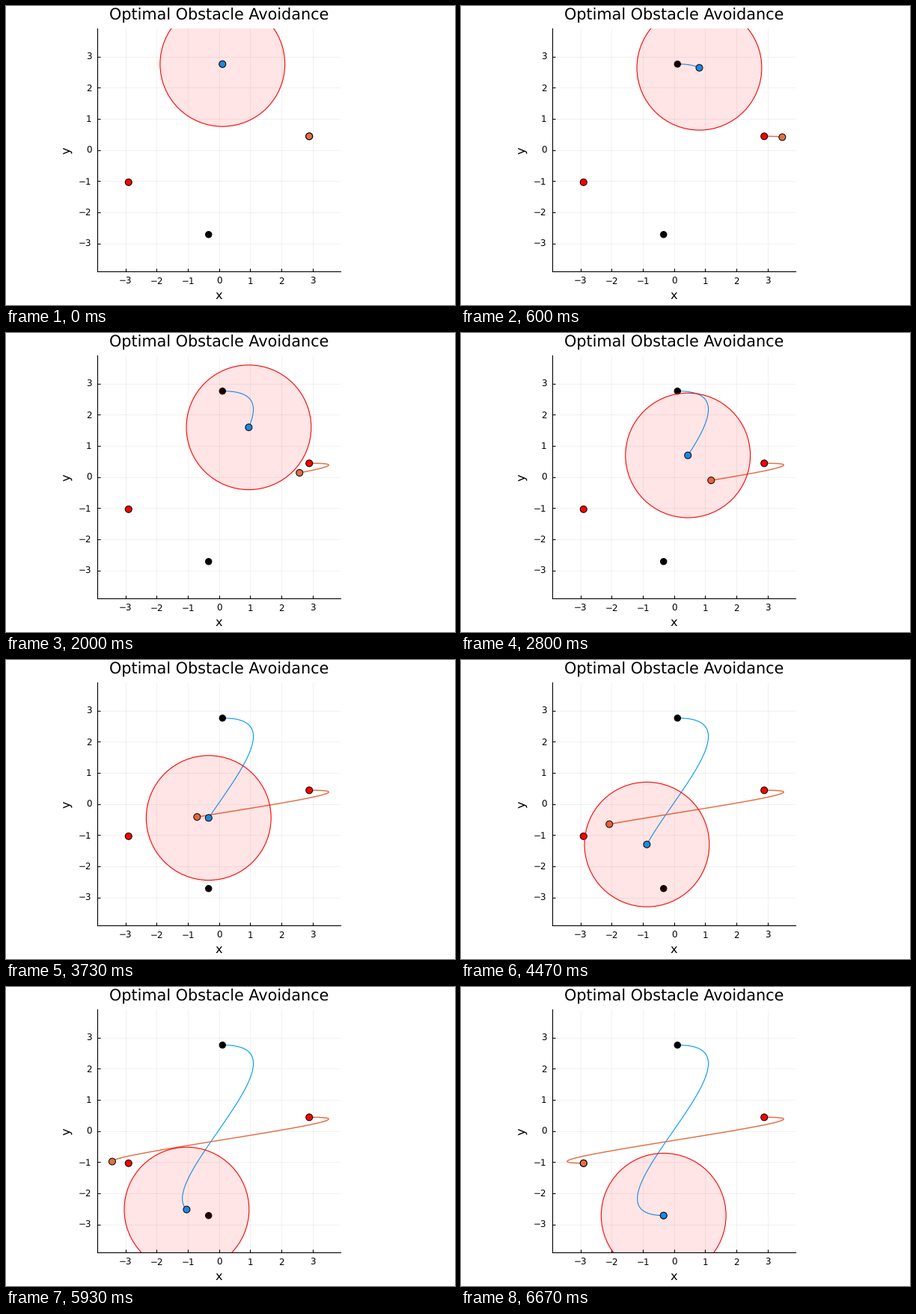
These frames come from a looping animation (600x400 px, 6740 ms). A matplotlib script:

```python
import numpy as np
import matplotlib.pyplot as plt
from matplotlib.animation import FuncAnimation
from matplotlib.patches import Circle

W, H, DPI = 600, 400, 100
LOOP, TICK = 6740, 20            # ms
STEPS, STEP_MS = 100, 1000 / 15  # states per run, time of each
LIM, UNIT = 3.9, 41.7            # axis limit, pixels per unit
CX, CY = 284.7, 192.7            # pixel place of the axes' zero
BLUE, ORANGE = "#009afa", "#e26f46"
THIN = 0.8
TITLE, GUIDE, LABEL = (1.067 * pt for pt in (14, 11, 8))

plt.rcParams["font.family"] = "DejaVu Sans"
plt.rcParams["text.hinting"] = "no_hinting"


def hermite(p0, p1, v0, v1):
    """Cubic path between two points with given end velocities."""
    s = np.linspace(0, 1, STEPS + 1)[:, None]
    p0, p1, v0, v1 = map(np.array, (p0, p1, v0, v1))
    return (p0 + (p1 - p0) * s**2 * (3 - 2 * s)
            + v0 * s * (1 - s)**2 - v1 * s**2 * (1 - s))


blue_path = hermite((0.11, 2.757), (-0.335, -2.711), (10.47, 0.08), (9.54, -0.104))
orange_path = hermite((2.89, 0.441), (-2.90, -1.033), (10.48, 0.07), (9.54, -0.045))

fig = plt.figure(figsize=(W / DPI, H / DPI), dpi=DPI, facecolor="white")
half = LIM * UNIT
ax = fig.add_axes([(CX - half) / W, 1 - (CY + half) / H, 2 * half / W, 2 * half / H])
ax.set(xlim=(-LIM, LIM), ylim=(-LIM, LIM))
ticks = range(-3, 4)
ax.set_xticks(ticks, [""] * len(ticks))
ax.set_yticks(ticks, [""] * len(ticks))
ax.tick_params(direction="in", length=2.9, width=THIN)
ax.grid(color="black", alpha=0.1, lw=0.4)
ax.set_axisbelow(True)
ax.spines[["top", "right"]].set_visible(False)
ax.spines[["left", "bottom"]].set_linewidth(THIN)


def put(x, y, text, size, ha="center", va="baseline", **kw):
    fig.text(x / W, 1 - y / H, text, size=size, ha=ha, va=va, **kw)


put(CX, 18.5, "Optimal Obstacle Avoidance", TITLE)
put(CX, 392, "x", GUIDE)
put(82, CY, "y", GUIDE, va="center", rotation=90)
for n in ticks:
    label = str(n).replace("-", "\u2212")
    put(CX + UNIT * n, 371.5, label, LABEL)
    put(114.7, CY + 4.4 - UNIT * n, label, LABEL, ha="right")


def dot(point, color, radius=4.5, z=4):
    return ax.add_patch(Circle(point, radius / UNIT, fc=color, ec="black",
                               lw=0.72, zorder=z))


for i in (0, -1):
    dot(blue_path[i], "black", 4.2)
    dot(orange_path[i], "red")

movers = []
for path, color, width in ((blue_path, BLUE, THIN), (orange_path, ORANGE, 1.05)):
    trail, = ax.plot([], [], color=color, lw=width, zorder=3)
    movers.append((path, trail, dot(path[0], color, z=5)))

zone = ax.add_patch(Circle(blue_path[0], 2, fc=(1, 0, 0, 0.1), ec="red",
                           lw=THIN, zorder=6))


def draw(i):
    k = min(int((i + 0.75) * TICK / STEP_MS), STEPS)
    for path, trail, head in movers:
        trail.set_data(*path[:k + 1].T)
        head.center = path[k]
    zone.center = blue_path[k]
    return []


anim = FuncAnimation(fig, draw, frames=LOOP // TICK, interval=TICK,
                     init_func=lambda: draw(0), repeat=True, repeat_delay=0)
plt.show()
```
